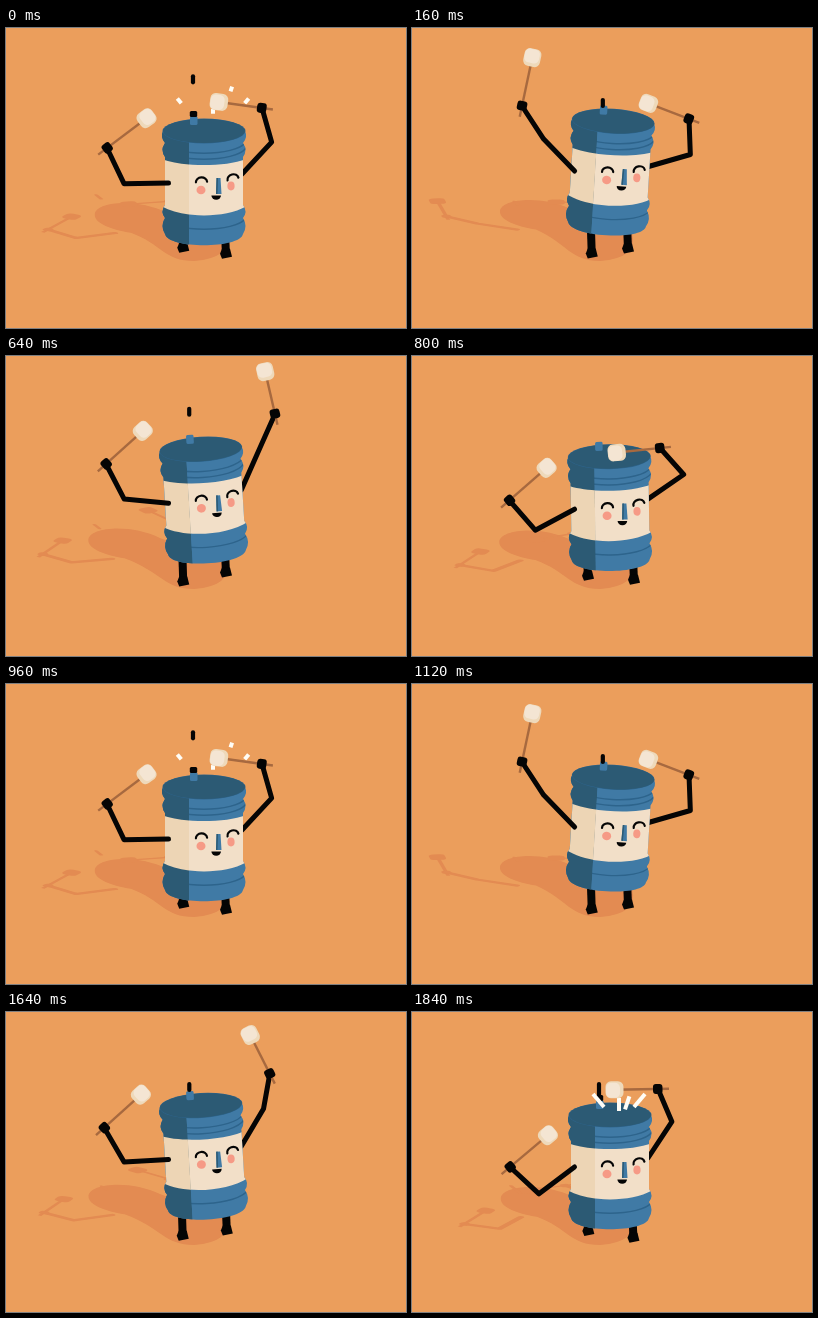
An HTML page with a canvas that plays this animation: 400x300 px, repeating every 1.88 s.

```html
<!DOCTYPE html>
<html lang="en">
<head>
<meta charset="utf-8">
<title>Drumming barrel</title>
<style>
  html, body { margin: 0; width: 100%; height: 100%; overflow: hidden; background: #eb9e5c; }
  canvas { display: block; width: 400px; height: 300px; }
</style>
</head>
<body>
<canvas id="stage"></canvas>
<script>
const LOOP = 1880, CYCLE = 960, STEP = 40;
const C = {
  bg: '#eb9e5c', shadow: '#e38b52', ink: '#050505', dark: '#2c5a74', blue: '#407aa5',
  seam: '#2d648c', cream: '#f2dfc8', creamDark: '#edd5b5', cheek: '#f69a86',
  puff: '#f4e5d3', puffDark: '#eed9ba', stick: '#a7693f', white: '#fffdf6'
};

// Key poses: time, hand x, hand y, stick angle above the inward horizontal.
// The elbow follows from the bone lengths.
const LEFT = {
  side: 1, joint: [-35.5, -50], upper: 44.5, fore: 39.5, reach: 49.5,
  keys: [[0, 101, 120, 37], [160, 110, 78, 78], [340, 146, 90, -6],
    [480, 122, 89, 38], [640, 100, 108, 42], [880, 98, 155, 40]]
};
const RIGHT = {
  side: -1, joint: [38, -59], upper: 43.5, fore: 35.5, reach: 43.5,
  keys: [[0, 256, 80, 8], [160, 277, 91, 21], [400, 292, 146, 41],
    [480, 285, 105, 41], [640, 269, 58, 77], [800, 248, 92, -6], [880, 246, 77, -1]]
};

const canvas = document.getElementById('stage');
const ctx = canvas.getContext('2d');
const ratio = window.devicePixelRatio || 1;
canvas.width = 400 * ratio;
canvas.height = 300 * ratio;

const lerp = (a, b, k) => a + (b - a) * k;
const clamp = k => Math.max(0, Math.min(1, k));
const since = (t, start) => (t - start + CYCLE) % CYCLE;
const wave = (t, peak) => Math.cos((t - peak) / CYCLE * Math.PI * 2);

// Smooth periodic curve through key poses
function sample(keys, t) {
  const n = keys.length;
  const key = i => {
    const [time, ...pose] = keys[(i + n) % n];
    return [time + Math.floor(i / n) * CYCLE, ...pose];
  };
  let i = n - 1;
  while (keys[i][0] > t) i--;
  const [p, a, b, q] = [key(i - 1), key(i), key(i + 1), key(i + 2)];
  const d = b[0] - a[0], s = (t - a[0]) / d, s2 = s * s, s3 = s2 * s;
  return [1, 2, 3].map(j => {
    const m0 = (b[j] - p[j]) / (b[0] - p[0]) * d;
    const m1 = (q[j] - a[j]) / (q[0] - a[0]) * d;
    return a[j] * (2 * s3 - 3 * s2 + 1) + m0 * (s3 - 2 * s2 + s)
      + b[j] * (3 * s2 - 2 * s3) + m1 * (s3 - s2);
  });
}

// One hop per half cycle, leaning right and left in turn
function bodyAt(t) {
  const half = CYCLE / 2;
  const hop = Math.max(0, Math.sin((t % half) / half * Math.PI / 0.72));
  const lean = t < half ? hop : -hop;
  return { x: 198 - 3 * lean, y: 205 - 10 * hop, tilt: lean * 0.061 };
}

function onBody({ x, y, tilt }, px, py) {
  const c = Math.cos(tilt), s = Math.sin(tilt);
  return [x + px * c - py * s, y + px * s + py * c];
}

function armAt(arm, t, body) {
  const { side, upper, fore, reach } = arm;
  const [hx, hy, deg] = sample(arm.keys, t);
  const [sx, sy] = onBody(body, ...arm.joint);
  const d = Math.hypot(hx - sx, hy - sy);
  const ux = (hx - sx) / d, uy = (hy - sy) / d;
  const along = d > upper + fore
    ? d * upper / (upper + fore)
    : (upper ** 2 - fore ** 2 + d * d) / (2 * d);
  const bend = side * Math.sqrt(Math.max(0, upper ** 2 - along ** 2));
  const a = deg * Math.PI / 180;
  return {
    bones: [sx, sy, sx + ux * along + uy * bend, sy + uy * along - ux * bend, hx, hy],
    angle: Math.atan2(-Math.sin(a), side * Math.cos(a)), hx, hy, reach
  };
}

function line(points, color, width, cap = 'round') {
  ctx.beginPath();
  for (let i = 0; i < points.length; i += 2) ctx.lineTo(points[i], points[i + 1]);
  ctx.strokeStyle = color;
  ctx.lineWidth = width;
  ctx.lineCap = cap;
  ctx.lineJoin = 'round';
  ctx.stroke();
}

function poly(points, color) {
  ctx.beginPath();
  for (let i = 0; i < points.length; i += 2) ctx.lineTo(points[i], points[i + 1]);
  ctx.fillStyle = color;
  ctx.fill();
}

function oval(x, y, rx, ry, color, end = Math.PI * 2) {
  ctx.beginPath();
  ctx.ellipse(x, y, rx, ry, 0, 0, end);
  ctx.fillStyle = color;
  ctx.fill();
}

function box(x, y, w, h, r, color) {
  ctx.beginPath();
  ctx.moveTo(x + r, y);
  ctx.arcTo(x + w, y, x + w, y + h, r);
  ctx.arcTo(x + w, y + h, x, y + h, r);
  ctx.arcTo(x, y + h, x, y, r);
  ctx.arcTo(x, y, x + w, y, r);
  ctx.fillStyle = color;
  ctx.fill();
}

function mallet({ hx, hy, angle, reach }, flat) {
  ctx.save();
  ctx.translate(hx, hy);
  ctx.rotate(angle);
  line([-11, 0, reach, 0], flat || C.stick, flat ? 4 : 2.4, 'butt');
  box(reach - 9, -8.5, 18, 17, 5.5, flat || C.puffDark);
  if (!flat) box(reach - 5.5, -8, 14, 15, 5, C.puff);
  box(-4.5, -5, 9.5, 10, 3, flat || C.ink);
  ctx.restore();
}

function shadow(body, arms, drop) {
  const [tx, ty] = onBody(body, 0, -102);
  const x = 0.877 * tx + 0.37 * ty - 91, y = -0.107 * tx + 0.29 * ty + 179;
  ctx.beginPath();
  ctx.moveTo(x - 32, y - 1);
  ctx.bezierCurveTo(x - 32, y - 14, x + 10, y - 18, x + 40, y - 3);
  ctx.lineTo(220, 205);
  ctx.quadraticCurveTo(227, 230, 188, 233);
  ctx.bezierCurveTo(158, 233, 156, 216, x + 4, y + 17);
  ctx.bezierCurveTo(x - 15, y + 14, x - 32, y + 8, x - 32, y - 1);
  ctx.fillStyle = C.shadow;
  ctx.fill();

  // Everything else is laid on the ground by one slanted projection
  ctx.save();
  ctx.transform(0.877, -0.107, 0.37, 0.29, -91, 177.5);
  for (const arm of arms) {
    line(arm.bones, C.shadow, 7);
    mallet(arm, C.shadow);
  }
  if (drop) line([drop.x + 5, drop.top - 12, drop.x + 5, drop.bottom - 8], C.shadow, 4);
  ctx.restore();
}

function leg(x, y, top) {
  line([x - 1, top, x, y - 3], C.ink, 8, 'butt');
  poly([x - 4, y - 9, x + 4, y - 9, x + 6, y - 1, x + 1, y, x - 4, y + 1, x - 6, y - 4], C.ink);
}

// Right wall with its ridges, mirrored for the left
function outline() {
  const ridges = [[-102, -90], [-90, -76], [-28, -15], [-15, 1]];
  ctx.beginPath();
  ctx.moveTo(-41, -102);
  ctx.lineTo(41, -102);
  for (const [from, to] of ridges) {
    ctx.lineTo(from < -100 ? 41 : 39, from);
    ctx.quadraticCurveTo(44, (from + to) / 2, 39, to);
  }
  ctx.bezierCurveTo(36, 16, -36, 16, -39, 1);
  for (const [to, from] of ridges.reverse()) {
    ctx.lineTo(-39, from);
    ctx.quadraticCurveTo(-44, (from + to) / 2, to < -100 ? -41 : -39, to);
  }
}

function label() {
  ctx.beginPath();
  ctx.moveTo(-46, -75.5);
  ctx.bezierCurveTo(-25, -65.5, 25, -65.5, 46, -75.5);
  ctx.lineTo(46, -29);
  ctx.bezierCurveTo(25, -13.7, -25, -13.7, -46, -29);
  ctx.fill();
}

function seam(y) {
  ctx.beginPath();
  ctx.moveTo(-42, y);
  ctx.bezierCurveTo(-32, y + 15, 32, y + 15, 42, y);
  ctx.strokeStyle = C.seam;
  ctx.lineWidth = 1.4;
  ctx.stroke();
}

function eye(x, y, turn) {
  ctx.beginPath();
  ctx.ellipse(x, y, 5.6, 4.6, turn, Math.PI, Math.PI * 2);
  ctx.strokeStyle = C.ink;
  ctx.lineWidth = 2.2;
  ctx.lineCap = 'round';
  ctx.stroke();
}

function face() {
  eye(-2.5, -51, -0.05);
  eye(29, -54, -0.25);
  oval(-3, -43, 4.5, 4.3, C.cheek);
  oval(27, -47, 3.6, 4.4, C.cheek);
  poly([12.5, -55, 16.5, -55, 17.5, -39, 12, -39], C.blue);
  poly([12.5, -55, 14, -55, 13.5, -39, 12, -39], C.dark);
  oval(12.2, -37.5, 4.8, 4.2, C.ink, Math.PI);
}

function barrel({ x, y, tilt }, capped) {
  ctx.save();
  ctx.translate(x, y);
  ctx.rotate(tilt);
  ctx.save();
  outline();
  ctx.clip();
  ctx.fillStyle = C.blue;
  ctx.fillRect(-50, -120, 100, 140);
  [-91, -85, -15].forEach(seam);
  ctx.fillStyle = C.cream;
  label();
  ctx.beginPath();
  ctx.rect(-50, -120, 35, 140);
  ctx.clip();
  ctx.fillStyle = C.dark;
  ctx.fillRect(-50, -120, 35, 140);
  ctx.fillStyle = C.creamDark;
  label();
  ctx.restore();
  oval(0, -102, 41.5, 12.5, C.seam);
  oval(0, -102, 41, 12, C.dark);
  face();
  box(-14, -117, 7.5, 9, 1.5, C.blue);
  if (capped) box(-14.2, -122, 7.4, 6, 1.5, C.ink);
  ctx.restore();
}

// A squirt that leaves the spout after each hit, floats and falls back
function dropAt(t, body) {
  const age = Math.min(since(t, 840), since(t, 400));
  if (age >= 320) return null;
  const top = 46 + 24 * ((age - 160) / 120) ** 4;
  const length = lerp(21, 10, clamp((age - 80) / 40));
  return {
    age, top, bottom: Math.min(92, top + length),
    x: onBody(body, -11, -112)[0]
  };
}

// A fan of strokes that grow, break off and shrink to dots
function sparks(t) {
  const fromRight = since(t, 840), fromLeft = since(t, 360);
  const age = Math.min(fromRight, fromLeft);
  if (age > 120) return;
  const flip = x => fromLeft < fromRight ? 389 - x : x;
  const grow = clamp(age / 40), fly = clamp((age - 40) / 80);
  for (const [spread, far] of [[-1, 1.7], [0, 1.2], [0.4, 2.8], [1, 1.7]]) {
    const at = k => [flip(207 + 15 * spread + 11 * spread * k),
      99 - 4 * Math.abs(spread) - 13 * k];
    line([...at(lerp(0, far - 0.18, fly)), ...at(lerp(grow, far + 0.18, fly))], C.white, 4, 'butt');
  }
}

function draw(t) {
  const body = bodyAt(t), drop = dropAt(t, body);
  const left = armAt(LEFT, t, body), right = armAt(RIGHT, t, body);

  ctx.setTransform(ratio, 0, 0, ratio, 0, 0);
  ctx.fillStyle = C.bg;
  ctx.fillRect(0, 0, 400, 300);

  shadow(body, [left, right], drop);
  const step = wave(t, 320);
  leg(178.5 + 2.5 * step, 229.5 + 6.5 * wave(t, 400), body.y);
  leg(218 - 4 * step, 222.5 - 7.5 * wave(t, 440), body.y);
  line(right.bones, C.ink, 5);
  barrel(body, drop && drop.age >= 40 && drop.age <= 160);
  if (drop) line([drop.x, drop.top + 2, drop.x, drop.bottom - 2], C.ink, 4.2);
  sparks(t);
  mallet(right);
  line(left.bones, C.ink, 5);
  mallet(left);
}

const start = performance.now();
function tick() {
  const t = (performance.now() - start) % LOOP;
  draw(Math.floor(t / STEP) * STEP % CYCLE);
  requestAnimationFrame(tick);
}
tick();
</script>
</body>
</html>
```
